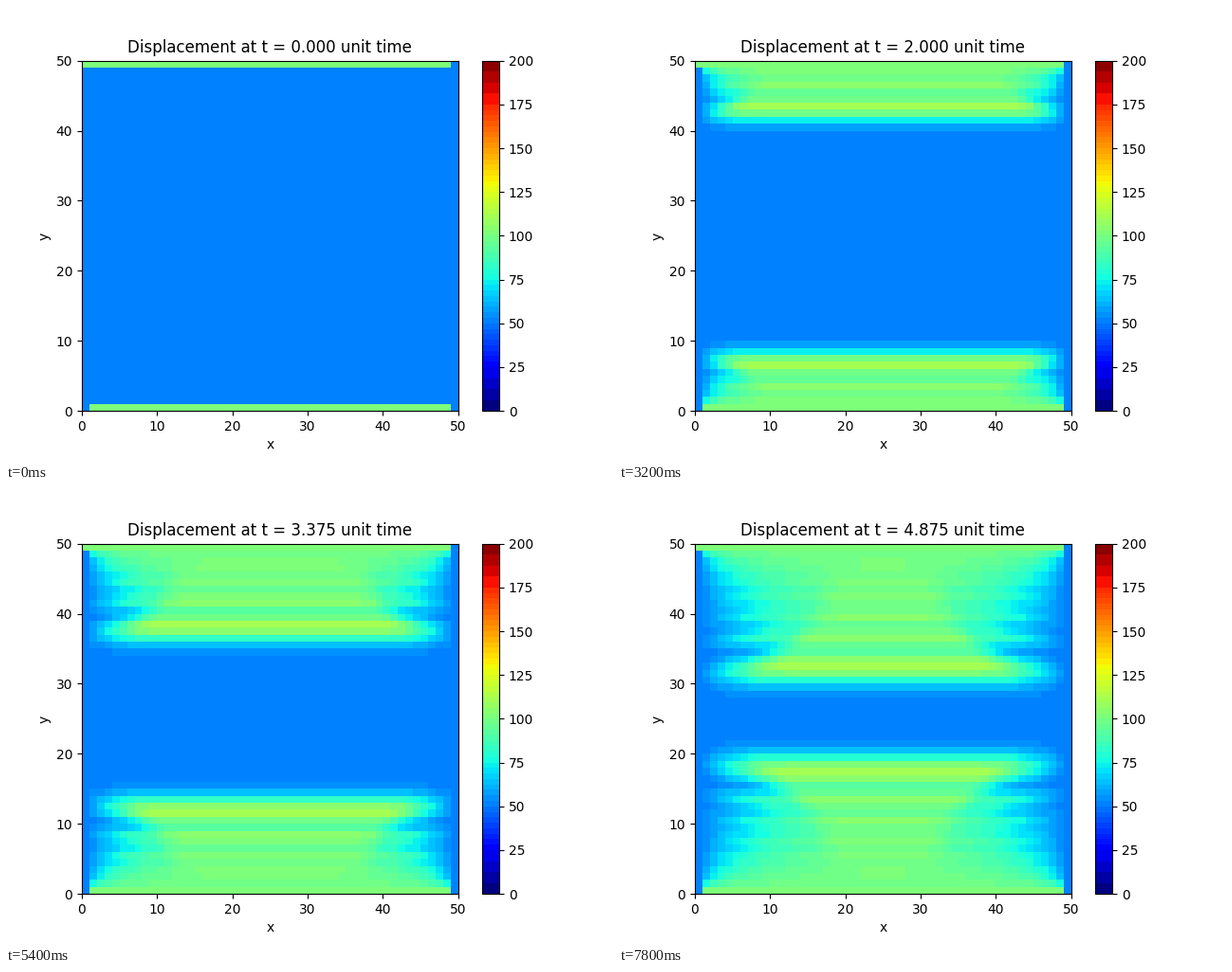
Recreate the animation shown at these times as a matplotlib script. Size 640 px wide and 480 px high, loop 8 s.

```python
import numpy as np
import matplotlib.pyplot as plt
from matplotlib.animation import FuncAnimation
from matplotlib.colors import ListedColormap

N = 50            # cells per side
FRAMES = 40
DT = 0.125
SPEED = 4.0
REST, EDGE = 50.0, 100.0


def solve():
    """Explicit wave equation with fixed borders, starting from rest."""
    r = (SPEED * DT) ** 2
    u = np.full((N, N), REST)
    u[0, 1:-1] = EDGE
    u[-1, :-1] = EDGE
    prev = u.copy()
    states = [u]
    for _ in range(FRAMES - 1):
        nxt = u.copy()
        lap = (u[2:, 1:-1] + u[:-2, 1:-1] + u[1:-1, 2:] + u[1:-1, :-2]
               - 4 * u[1:-1, 1:-1])
        nxt[1:-1, 1:-1] = 2 * u[1:-1, 1:-1] - prev[1:-1, 1:-1] + r * lap
        prev, u = u, nxt
        states.append(u)
    return states


def banded_jet(n=64):
    """Jet in flat bands, twice as wide at the dark ends."""
    i = np.arange(n)
    ends = (i < n // 8) | (i >= n - n // 8)
    pos = np.where(ends, i // 2 * 2, i) / n
    pos[i >= n - n // 8] += 1 / n
    return ListedColormap(plt.get_cmap("jet")(pos))


states = solve()

plt.rcParams["font.family"] = "DejaVu Sans"
fig, ax = plt.subplots(figsize=(6.4, 4.8), dpi=100)
mesh = ax.pcolormesh(states[0], cmap=banded_jet(), vmin=0, vmax=200)
fig.colorbar(mesh, ax=ax, ticks=range(0, 201, 25))
ax.set_xlabel("x")
ax.set_ylabel("y")
title = ax.set_title("")


def draw(k):
    mesh.set_array(states[k])
    title.set_text(f"Displacement at t = {k * DT:.3f} unit time")
    return mesh, title


anim = FuncAnimation(fig, draw, frames=FRAMES, init_func=lambda: draw(0),
                     interval=200, repeat=True, repeat_delay=0, blit=False)
plt.show()
```
